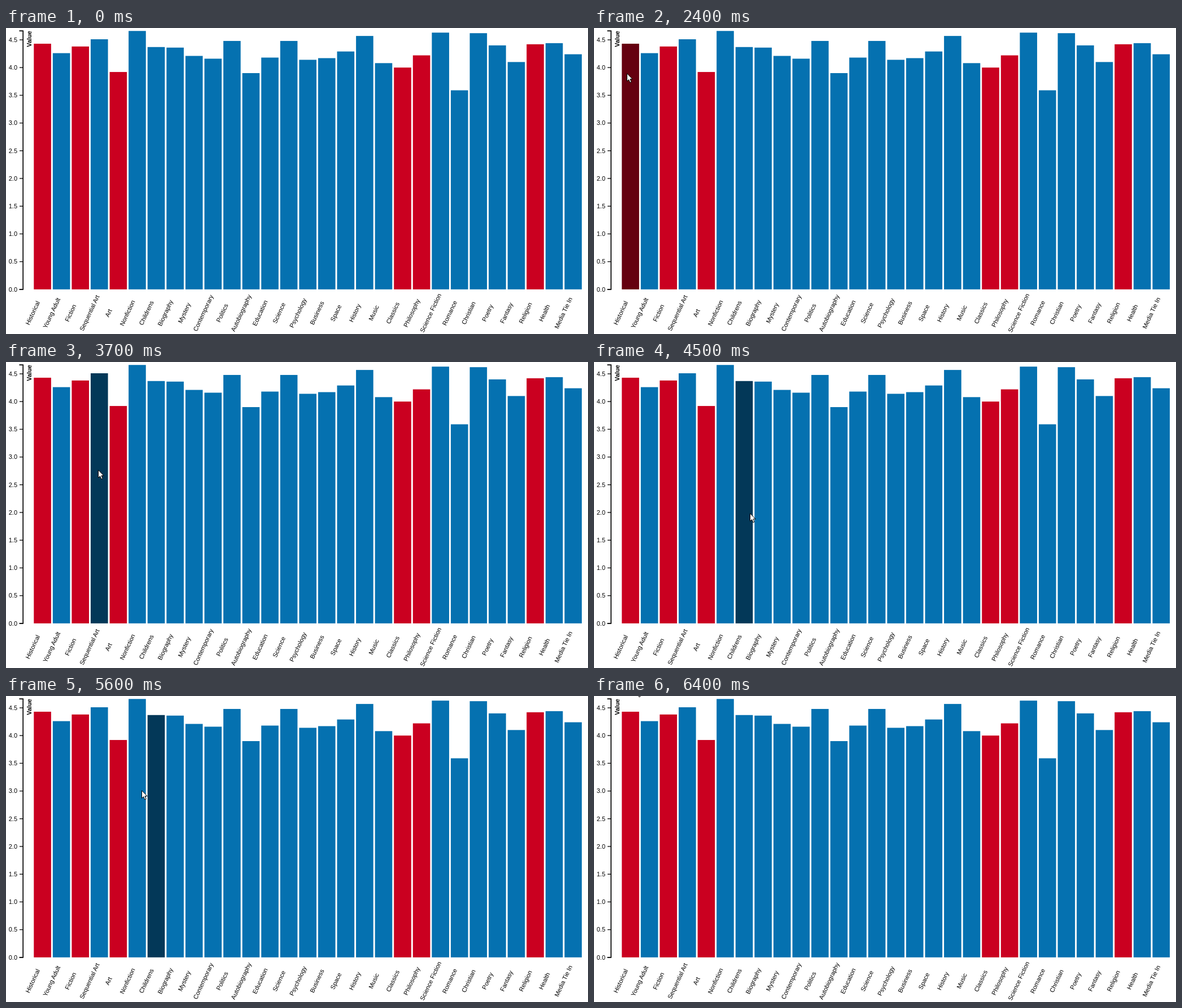
These frames come from a looping animation (1031 px wide and 543 px high, 6.6 s). An HTML page:

```html
<!DOCTYPE html>
<html lang="en">
<head>
<meta charset="utf-8">
<title>Bar chart</title>
<style>
  html, body { margin: 0; width: 100%; height: 100%; overflow: hidden; background: #fff; }
  svg { display: block; }
  text { font: 11px "Liberation Sans", Arial, sans-serif; fill: #000; }
  .title { font-weight: bold; }
  .axis { fill: none; stroke: #000; }
</style>
</head>
<body>
<svg id="chart" width="1031" height="543" viewBox="0 0 1031 543"></svg>
<script>
const LOOP = 6600, STEP = 100, LAG = 60;
const BASE = 463.8, UNIT = 98.4, LEFT = 49.3, PITCH = 33.575, BAR = 30.6;
const RED = ["#ca0020", "#650010"], BLUE = ["#0571b0", "#033858"];

// Category and value; a star marks a red bar
const data = `Historical* 4.43, Young Adult 4.26, Fiction* 4.38, Sequential Art 4.51, Art* 3.92,
  Nonfiction 4.66, Childrens 4.37, Biography 4.36, Mystery 4.21, Contemporary 4.16, Politics 4.48,
  Autobiography 3.9, Education 4.18, Science 4.48, Psychology 4.14, Business 4.17, Space 4.29,
  History 4.57, Music 4.08, Classics* 4, Philosophy* 4.22, Science Fiction 4.63, Romance 3.59,
  Christian 4.62, Poetry 4.4, Fantasy 4.1, Religion* 4.42, Health 4.44, Media Tie In 4.24`
  .split(",").map(entry => {
    const [, name, star, value] = entry.trim().match(/^(.+?)(\*?) ([\d.]+)$/);
    return { name, colors: star ? RED : BLUE, top: BASE - value * UNIT };
  });

// Pointer moves: start and end time, then where it goes; it rests in between
const origin = { x: 82, y: -3 };
const moves = [
  [1000, 1400, 51, 70],
  [2300, 2400, 58, 80],
  [2700, 2730, 89, 112],
  [2900, 3700, 163, 191],
  [3700, 4200, 215, 227],
  [4200, 4300, 247, 247],
  [4300, 4500, 276, 268],
  [4500, 4900, 341, 293],
  [5400, 5800, 139, 40],
  [5800, 6100, 74, -15]
];

const chart = document.getElementById("chart");

function add(tag, attrs, label) {
  const el = document.createElementNS("http://www.w3.org/2000/svg", tag);
  for (const key in attrs) el.setAttribute(key, attrs[key]);
  if (label) el.textContent = label;
  return chart.appendChild(el);
}

const bars = data.map(({ name, top }, i) => {
  const x = LEFT + i * PITCH;
  add("text", {
    "text-anchor": "middle",
    transform: `translate(${x + BAR / 2 - 13.9} 507.3) rotate(-65)`
  }, name);
  return add("rect", { x, y: top, width: BAR, height: BASE - top });
});

for (let v = 0; v <= 4.5; v += 0.5) {
  const y = BASE - v * UNIT;
  add("path", { class: "axis", d: `M24 ${y}H30`, "stroke-width": 1.3 });
  add("text", { x: 20, y: y + 3.7, "text-anchor": "end" }, v.toFixed(1));
}
add("path", { class: "axis", d: `M23.5 5.2H30.2V${BASE}H23.5`, "stroke-width": 1.7 });
add("text", { class: "title", "text-anchor": "end", transform: "translate(45 5) rotate(-90)" }, "Value");

const pointer = add("path", {
  d: "M.5 .8V14.4L3.6 11.6L5.9 16.8L8.2 15.8L6 10.7H10.2Z",
  fill: "#fff", stroke: "#000", "stroke-width": 1
});

function pointAt(t) {
  let { x, y } = origin;
  for (const [from, to, toX, toY] of moves) {
    const k = Math.min(1, Math.max(0, (t - from) / (to - from)));
    x += (toX - x) * k;
    y += (toY - y) * k;
  }
  return { x, y };
}

// The highlight trails the pointer a little
function barUnder({ x, y }) {
  const i = Math.floor((x - LEFT) / PITCH);
  return data[i] && y > data[i].top ? i : -1;
}

function draw(time) {
  const t = Math.floor((time % LOOP) / STEP) * STEP;
  const lit = barUnder(pointAt(t - LAG));
  bars.forEach((bar, i) => bar.setAttribute("fill", data[i].colors[i === lit ? 1 : 0]));
  const { x, y } = pointAt(t);
  pointer.setAttribute("visibility", t < moves[0][0] ? "hidden" : "visible");
  pointer.setAttribute("transform", `translate(${Math.round(x)} ${Math.round(y)})`);
}

const start = performance.now();
function tick() {
  draw(performance.now() - start);
  requestAnimationFrame(tick);
}
tick();
</script>
</body>
</html>
```
